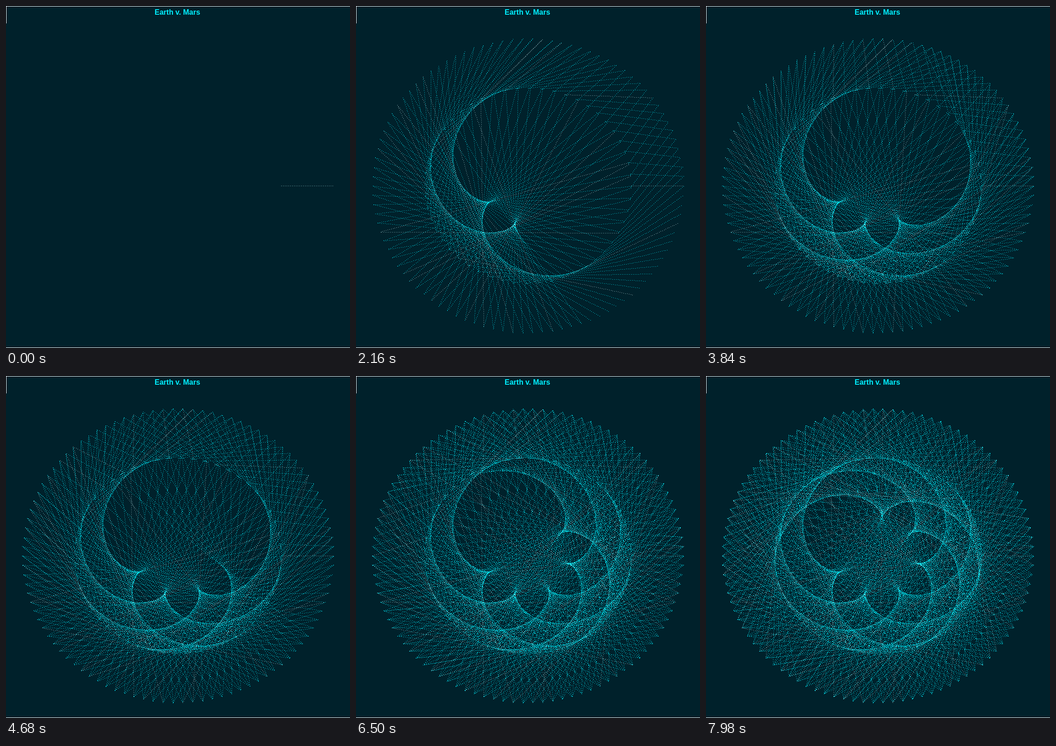
Animation of 750 by 746 pixels, one loop 8000 ms. Source, as an HTML page with a canvas:

```html
<!DOCTYPE html>
<html lang="en">
<head>
<meta charset="utf-8">
<title>Earth v. Mars</title>
<style>
  html, body { margin: 0; width: 100%; height: 100%; overflow: hidden; background: #00212b; }
  canvas { display: block; }
</style>
</head>
<body>
<canvas id="stage" width="750" height="746"></canvas>
<script>
const ctx = document.getElementById('stage').getContext('2d');
const LOOP = 8000, TICK = 20, LINES_PER_TICK = 18 / 11, DOT_GAP = 4;
const CYAN = '#00f0ff', PALE = '#a8d4d8', PALE_SHARE = 0.12;
const CENTER = { x: 374.5, y: 391.7 };
const marsStep = 2 * Math.PI / 98;
const earth = { rx: 225, ry: 213, step: marsStep * 687 / 365 };
const mars = { rx: 340, ry: 321.3, step: marsStep };

let drawn = 0; // lines already on the canvas

function position(planet, n) {
  const angle = n * planet.step;
  return {
    x: Math.round(CENTER.x + planet.rx * Math.cos(angle)),
    y: Math.round(CENTER.y - planet.ry * Math.sin(angle))
  };
}

function fraction(n) {
  const v = Math.sin(n * 127.1) * 43758.5453;
  return v - Math.floor(v);
}

function drawBackground() {
  ctx.fillStyle = '#00212b';
  ctx.fillRect(0, 0, 750, 746);
  ctx.fillStyle = '#fff';
  ctx.fillRect(0, 0, 750, 1);
  ctx.fillRect(0, 0, 1, 38);
  ctx.fillRect(0, 745, 750, 1);
  ctx.fillStyle = CYAN;
  ctx.font = 'bold 16px "Liberation Sans", Arial, sans-serif';
  ctx.fillText('Earth v. Mars', 324, 19);
}

function drawDottedLine(n) {
  const a = position(earth, n), b = position(mars, n);
  const dx = b.x - a.x, dy = b.y - a.y;
  const length = Math.hypot(dx, dy);
  ctx.fillStyle = fraction(n) < PALE_SHARE ? PALE : CYAN;
  for (let i = 0; i <= length; i += DOT_GAP) {
    ctx.fillRect(Math.round(a.x + dx * i / length), Math.round(a.y + dy * i / length), 1, 1);
  }
}

function render(time) {
  const tick = Math.floor((time % LOOP) / TICK);
  const wanted = Math.floor(tick * LINES_PER_TICK + 0.6) + 1;
  if (drawn === 0 || wanted < drawn) {
    drawBackground();
    drawn = 0;
  }
  while (drawn < wanted) drawDottedLine(drawn++);
}

const start = performance.now();
function frame() {
  render(performance.now() - start);
  requestAnimationFrame(frame);
}
frame();
</script>
</body>
</html>
```
